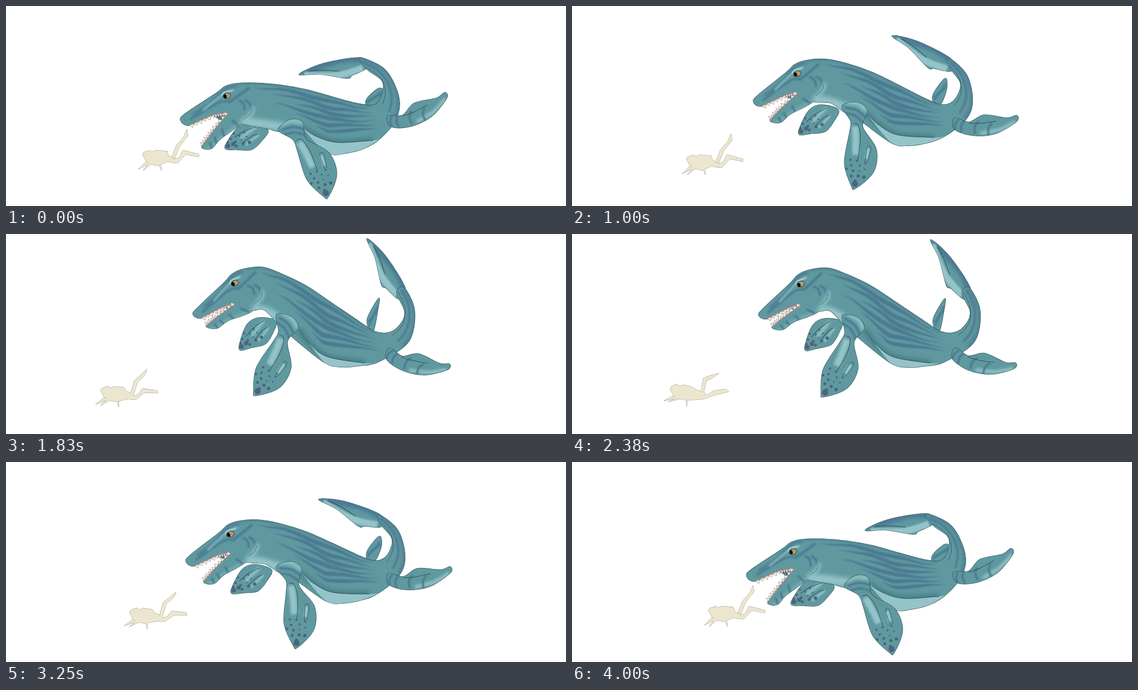
An HTML page with a canvas that plays this animation: 1080 px wide and 387 px high, repeating every 4040 ms.

```html
<!DOCTYPE html>
<html lang="en">
<head>
<meta charset="utf-8">
<title>Marine reptile and diver</title>
<style>
  html, body { margin: 0; width: 100%; height: 100%; overflow: hidden; background: #fff; }
  canvas { display: block; width: 100%; height: 100%; }
</style>
</head>
<body>
<canvas id="stage" width="1080" height="387"></canvas>
<script>
const ctx = document.getElementById('stage').getContext('2d');
const LOOP = 4040, TAU = Math.PI * 2;
const TEAL = '#5f999f', BLUE = '#4b7a93', LIGHT = '#94c4c9', INK = '#2b4a52', SPOT = '#4c647e', CREAM = '#ece6cf';

// Morphing shapes: each row of four is x, y when low and x, y when raised.
const UPPER = [
  426,207,440,136, 400,211,418,143, 354,231,377,164, 337,222,360,157, 345,209,370,143, 405,169,421,95,
  422,156,436,79, 445,150,460,69, 480,149,495,66, 530,153,530,78, 580,162,578,101, 630,176,625,132,
  675,188,680,169, 705,192,712,189, 719,184,740,190, 727,163,760,174, 724,143,768,150, 697,123,752,114];
const LOWER = [
  683,100,766,104, 732,124,786,143, 758,178,784,190, 752,220,765,220, 720,258,715,249, 690,276,685,255, 655,285,650,258,
  620,285,615,250, 560,248,555,203, 525,243,524,175, 503,237,498,149, 470,231,475,150, 430,222,440,150];
const JAW = [
  428,207,441,137, 398,243,405,163, 378,270,386,179, 384,277,395,185,
  398,275,409,184, 412,259,428,170, 452,228,474,151, 460,205,475,125];
const BELLY_LINE = [572,236,565,185, 600,253,585,212, 640,264,620,238, 708,260,692,250];
const CHEST = [453,226,474,148, 485,227,502,151, 545,236,542,176];
const FAR_HIND = [695,192,700,184, 697,178,697,163, 720,159,719,125, 730,170,717,150, 715,192,709,187];
const FLANK = [470,212,490,135, 530,220,535,158, 620,253,608,222, 730,245,735,235];

// Rigid shapes, in low-pose coordinates.
const FLUKE = [565,133, 600,115, 645,104, 683,100, 697,108, 695,121, 668,134, 657,140, 605,132];
const HIND = [736,213, 765,211, 787,188, 830,178, 846,167, 850,178, 825,210, 800,226, 770,235, 742,233];
const FRONT = [525,240, 548,220, 572,225, 579,257, 622,283, 638,325, 622,369, 612,368, 580,335, 562,280, 553,258];
const FAR_FRONT = [450,232, 426,264, 424,277, 445,278, 474,278, 494,260, 505,240, 475,226];

// Diver rows: gliding x, y then kicking x, y.
const TORSO = [
  -26,-6,-27,-6, -23,-12,-24,-10, -13,-16,-12,-14, -10,-12,-9,-10, 2,-14,-2,-14, 12,-11,21,-12, 24,-5,23,-4,
  42,1,34,2, 42,13,36,11, 28,16,22,8, 6,15,2,16, -14,12,-14,12, -20,6,-20,7];
const LEG = [34,2,30,-1, 37,-27,39,-24, 50,-30,53,-40, 70,-33,59,-54, 55,-24,61,-42, 43,-22,46,-23, 38,6,35,2];
const NEAR_LEG = [33,8,30,4, 48,5,44,1, 60,0,51,-14, 82,-6,82,-6, 88,-1,82,-1, 62,8,57,-6, 43,12,41,11, 28,16,24,8];
const ARM = [-20,7,-20,8, -39,15,-35,23, -14,12,-14,12];
const NEAR_ARM = [-12,10,-14,10, -30,17,-25,25, -8,13,-10,13];
const GAUGE = [4,12,4,12, 5,28,10,25, 7,12,8,12];

const lerp = (a, b, k) => a + (b - a) * k;
const mix = (p, q, k) => [lerp(p[0], q[0], k), lerp(p[1], q[1], k)];
const rows = (list, n) => Array.from({ length: list.length / n }, (_, i) => list.slice(i * n, i * n + n));
const morph = (list, k) => rows(list, 4).map(r => mix(r, [r[2], r[3]], k));
const pairs = list => rows(list, 2);

function along(points, u) {
  const x = u * (points.length - 1), i = Math.min(points.length - 2, Math.floor(x));
  return mix(points[i], points[i + 1], x - i);
}

// Points lying a given part of the way from one edge to another
const between = (a, b, depth, count = 5) =>
  Array.from({ length: count }, (_, i) => mix(along(a, i / (count - 1)), along(b, i / (count - 1)), depth));

// Catmull-Rom curve through the points
function smooth(points, closed = true) {
  const path = new Path2D(), n = points.length;
  const at = i => closed ? points[(i + n) % n] : points[Math.max(0, Math.min(n - 1, i))];
  path.moveTo(...points[0]);
  for (let i = 0; i < (closed ? n : n - 1); i++) {
    const [a, b, c, d] = [at(i - 1), at(i), at(i + 1), at(i + 2)];
    path.bezierCurveTo(b[0] + (c[0] - a[0]) / 6, b[1] + (c[1] - a[1]) / 6,
      c[0] - (d[0] - b[0]) / 6, c[1] - (d[1] - b[1]) / 6, c[0], c[1]);
  }
  if (closed) path.closePath();
  return path;
}

function fill(path, color, blur = 0) {
  ctx.filter = blur ? `blur(${blur}px)` : 'none';
  ctx.fillStyle = color;
  ctx.fill(path);
  ctx.filter = 'none';
}

function stroke(path, color = INK, width = 1, blur = 0) {
  ctx.filter = blur ? `blur(${blur}px)` : 'none';
  ctx.strokeStyle = color;
  ctx.lineWidth = width;
  ctx.stroke(path);
  ctx.filter = 'none';
}

const curve = (points, color, width, blur) => stroke(smooth(points, false), color, width, blur);
const line = (list, color, width, blur) => curve(pairs(list), color, width, blur);

function within(path, draw) {
  ctx.save();
  ctx.clip(path);
  draw();
  ctx.restore();
}

// Draws a rigid part whose joint travels from one place to another while it turns.
function part(k, [x0, y0], [x1, y1], degrees, draw) {
  ctx.save();
  ctx.translate(lerp(x0, x1, k), lerp(y0, y1, k));
  ctx.rotate(k * degrees * TAU / 360);
  ctx.translate(-x0, -y0);
  draw();
  ctx.restore();
}

function skin(points) {
  const path = smooth(points);
  stroke(path, INK, 1.4);
  fill(path, TEAL);
  return path;
}

function dot(x, y, r) {
  const path = new Path2D();
  path.arc(x, y, r, 0, TAU);
  fill(path, SPOT);
}

// Spots spread over an ellipse by the golden angle
function spots(x, y, rx, ry, count) {
  for (let i = 0; i < count; i++) {
    const reach = Math.sqrt((i + .5) / count), angle = i * 2.4;
    dot(x + rx * reach * Math.cos(angle), y + ry * reach * Math.sin(angle), 1.5 + 1.8 * (i * .618 % 1));
  }
}

function teeth(edge, count, height, side) {
  curve(edge, '#a08a84', 3);
  const path = new Path2D();
  for (let i = 0; i < count; i++) {
    const a = along(edge, i / count), b = along(edge, (i + .9) / count);
    const dx = b[0] - a[0], dy = b[1] - a[1], size = side * height * (i % 2 ? .8 : 1) / Math.hypot(dx, dy);
    path.moveTo(...a);
    path.lineTo((a[0] + b[0]) / 2 - dy * size, (a[1] + b[1]) / 2 + dx * size);
    path.lineTo(...b);
    path.closePath();
  }
  stroke(path, '#6d5d5a', 1);
  fill(path, '#f1e6df');
}

function drawFluke() {
  within(skin(pairs(FLUKE)), () => {
    line([570, 129, 645, 104, 694, 103], BLUE, 13, 3);
    line([575, 134, 640, 134, 688, 120], LIGHT, 13, 1.5);
  });
  line([583, 126, 610, 124, 643, 126], INK, 1);
}

function drawFarFront() {
  within(skin(pairs(FAR_FRONT)), () => {
    line([452, 256, 482, 234], LIGHT, 6, 2);
    line([462, 269, 488, 249], LIGHT, 4, 1.5);
    line([441, 254, 460, 242, 482, 234], INK, 1);
    line([455, 266, 474, 252, 486, 248], INK, 1);
    spots(449, 259, 25, 16, 11);
    dot(428, 271, 4.5);
    dot(438, 267, 4);
  });
}

function drawHind() {
  within(skin(pairs(HIND)), () => {
    line([792, 224, 825, 204, 848, 179], LIGHT, 6, 2.5);
    for (const x of [746, 758, 783, 809]) {
      const drop = (x - 746) / 4;
      line([x, 238 - drop, x - 5, 225 - drop, x - 2, 212 - drop], BLUE, 4, 1);
    }
  });
  line([765, 213, 785, 206, 813, 191], INK, 1);
}

function drawFront() {
  within(skin(pairs(FRONT)), () => {
    line([528, 230, 550, 222, 572, 226], LIGHT, 8, 3);
    for (const y of [240, 251]) line([532, y, 555, y - 6, 578, y - 1], BLUE, 4, 1);
    line([566, 263, 579, 286, 592, 312], LIGHT, 13, 2);
    line([608, 289, 614, 309], LIGHT, 7, 1);
    line([560, 260, 569, 258, 582, 273, 592, 294, 601, 321], INK, 1);
    line([616, 319, 605, 288, 612, 286, 619, 314], INK, .8);
    spots(608, 336, 24, 23, 13);
    dot(617, 362, 6);
  });
}

function drawFace() {
  line([360, 211, 392, 190, 423, 160, 445, 154], BLUE, 5, 2);
  line([355, 220, 410, 187, 432, 185], BLUE, 4, 1.5);
  line([380, 202, 418, 171, 440, 162], '#80b5bb', 4, 1.5);
  line([430, 186, 445, 176, 470, 158], BLUE, 5, 1.5);
  for (const x of [449, 461]) line([x, 182, x + 9, 189, x + 11, 202], BLUE, 4, 1);
  line([477, 196, 472, 210, 459, 221], LIGHT, 7, 3);
  line([476, 199, 470, 211, 458, 219], INK, .8);
  const eye = new Path2D(), pupil = new Path2D();
  eye.ellipse(426, 174, 7.5, 5.5, -.2, 0, TAU);
  pupil.ellipse(422.5, 175, 3, 4.2, -.3, 0, TAU);
  fill(eye, '#b39a6e');
  fill(pupil, '#0c0c0c');
  stroke(eye, '#293c40', 1);
  line([416, 174, 421, 167, 437, 164], '#a9d0d2', 2.5, .5);
}

function drawBody(k) {
  const outline = [...morph(UPPER, k), ...morph(LOWER, k)], jawLine = morph(JAW, k);
  const body = smooth(outline), jaw = smooth(jawLine);
  const back = outline.slice(7, 14), flank = morph(FLANK, k);
  const tailInside = outline.slice(14, 18), tailOutside = outline.slice(18, 22).reverse();

  // A long wavy mark, tapered at both ends
  const stripe = (depth, from, to, width) => {
    const side = sign => Array.from({ length: 15 }, (_, i) => {
      const u = lerp(from, to, i / 14);
      const v = depth + .02 * Math.sin(u * 19 + depth * 30) + sign * width * Math.sin(Math.PI * i / 14);
      return mix(along(back, u), along(flank, u), v);
    });
    fill(smooth([...side(-1), ...side(1).reverse()]), BLUE, 1);
  };

  stroke(body, INK, 1.4);
  stroke(jaw, INK, 1.4);
  fill(body, TEAL);
  fill(jaw, TEAL);

  within(body, () => {
    curve(back, '#507f90', 5, 2);
    curve(outline.slice(18, 22), '#507f94', 9, 3);
    curve(morph(CHEST, k), LIGHT, 17, 4);
    const bellyLine = morph(BELLY_LINE, k);
    curve(bellyLine, '#467985', 10, 5);
    fill(smooth([...bellyLine, ...outline.slice(22, 26)]), LIGHT);
    curve(bellyLine, INK, 1);
    for (let i = 0; i < 6; i++) stripe(.13 + .145 * i, .12 + .1 * (i % 3) + .05 * i, .98, .05);
    curve(between(tailInside, tailOutside, .2), INK, .8);
    curve(between(tailInside, tailOutside, .6), BLUE, 4, 1.5);
  });

  const lip = outline.slice(0, 3).reverse(), gum = jawLine.slice(0, 3).reverse();
  within(jaw, () => {
    const chin = jawLine.slice(3, 7);
    curve(chin, '#7eb3b8', 6, 3);
    for (let u = .3; u < 1; u += .22) curve([along(chin, u), mix(along(chin, u), along(gum, u), .55)], BLUE, 4, 1);
  });
  const [corner, lipBack] = outline, [hinge, gumBack] = jawLine;
  const throat = mix(corner, mix(lipBack, gumBack, .5), .6);
  fill(smooth([corner, lipBack, throat, mix(hinge, gumBack, .5)]), BLUE);
  teeth(lip, 11, 6.5, 1);
  teeth(gum, 11, 6.5, -1);
}

function drawReptile(k) {
  const farHind = morph(FAR_HIND, k);
  within(skin(farHind), () => {
    const [a, b, c, d] = farHind;
    for (const u of [.25, .6]) curve([mix(a, b, u), mix(c, d, u + .3)], BLUE, 3, 1);
  });
  part(k, [480, 232], [494, 168], -15, drawFarFront);
  part(k, [683, 105], [764, 108], 66.5, drawFluke);
  drawBody(k);
  part(k, [740, 225], [736, 232], 37, drawHind);
  part(k, [552, 235], [543, 175], 49.7, drawFront);
  part(k, [426, 174], [441, 97], -8.6, drawFace);
}

function drawDiver(turn) {
  const drift = (1 - Math.cos(turn + .05)) / 2, kick = (1 + Math.cos(4 * turn)) / 2;
  const figure = [TORSO, LEG, NEAR_LEG, ARM, NEAR_ARM, GAUGE].map(list => {
    const path = new Path2D();
    morph(list, kick).forEach(p => path.lineTo(...p));
    path.closePath();
    return path;
  });
  ctx.save();
  ctx.translate(290 - 82 * drift, 290 + 17 * drift + 3 * kick);
  figure.forEach(path => stroke(path, '#8d897a', 1));
  figure.forEach(path => fill(path, CREAM));
  ctx.restore();
}

function frame() {
  const turn = TAU * (performance.now() % LOOP) / LOOP, swing = turn - TAU * 40 / LOOP;
  const lift = 1.047 * ((1 - Math.cos(swing)) / 2 + .07 * Math.sin(swing) ** 2);
  ctx.clearRect(0, 0, 1080, 387);
  drawReptile(lift);
  drawDiver(turn);
  requestAnimationFrame(frame);
}
frame();
</script>
</body>
</html>
```
